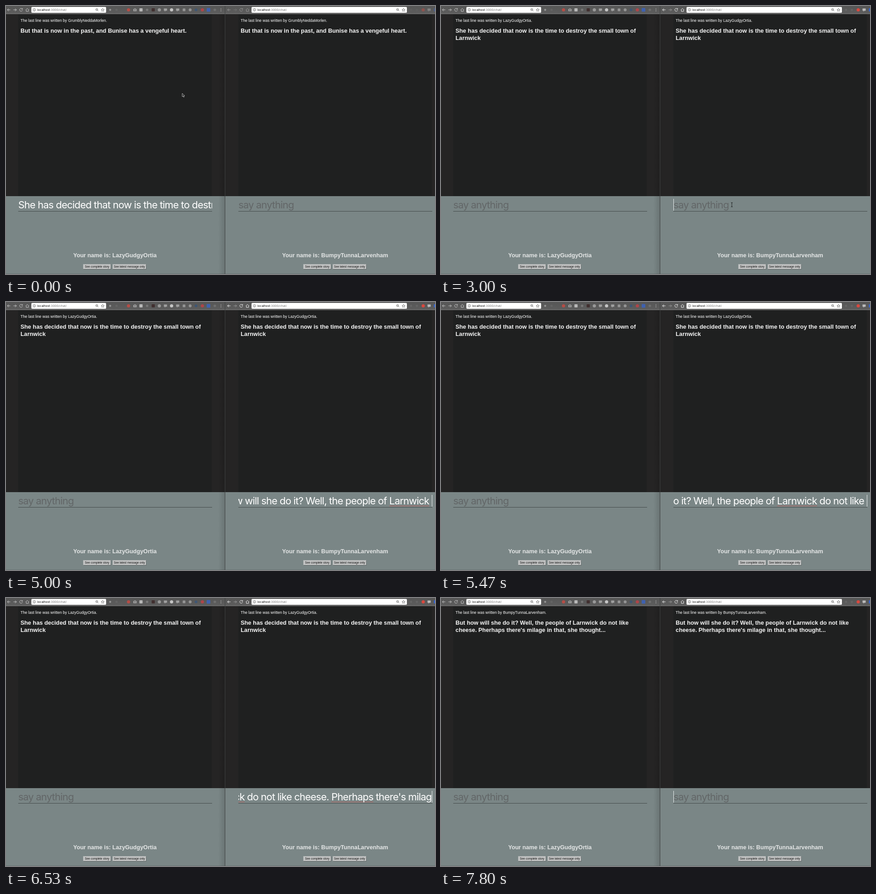
An HTML page that plays this animation: 947x592 px, repeating every 8000 ms.

```html
<!DOCTYPE html>
<html lang="en">
<head>
<meta charset="utf-8">
<title>Story chat</title>
<style>
html, body { margin: 0; width: 100%; height: 100%; overflow: hidden; background: #232222; }
body { position: relative; font-family: "Liberation Sans", Arial, sans-serif; }
div, svg, button { position: absolute; box-sizing: border-box; }
.win { top: 0; height: 592px; overflow: hidden; background: #252424; }
#left { left: 0; width: 483px; }
#right { left: 484px; width: 463px; }
.in { top: 0; left: 0; width: 484px; height: 592px; }
#right .in { left: 2px; }
.bar { left: -2px; top: 0; width: 486px; height: 18px; background: linear-gradient(#565656, #5d5d5d 85%, #707070); }
.bar svg { left: 2px; top: 0; overflow: visible; }
.icons { opacity: .72; }
#right .icons { opacity: .4; }
.active .icons, #right.active .icons { opacity: 1; }
.url { font: 6.6px Inter, sans-serif; fill: #777; }
.url .host { fill: #111; }
.panel { left: 27px; top: 18px; width: 427px; height: 402px; background: #1f2020; }
.foot { left: -2px; top: 420px; width: 486px; height: 172px; background: #7a8686; border-bottom: 1px solid #687373; }
.by { left: 32px; top: 27px; font-size: 8.55px; line-height: 10px; color: #fff; white-space: nowrap; }
.line { left: 32px; top: 47px; width: 418px; font: bold 12.82px/16px "Liberation Sans", Arial, sans-serif; color: #f4f4f4; }
.field { left: 27px; top: 426px; width: 427.5px; height: 28px; overflow: hidden; border-bottom: 1px solid #434a4a; }
.text { left: 0; top: 0; height: 26px; white-space: pre; font: 22px/26px Inter, sans-serif; letter-spacing: -.036em; color: #fff; }
.text.hint { color: #626667; }
.text u { text-decoration: underline 1px #b8605c; text-underline-offset: 3px; text-decoration-skip-ink: none; }
.caret { top: 0; width: 1px; height: 26px; background: #e9eeee; }
.name { left: 27px; top: 542.6px; width: 427px; text-align: center; font: bold 12.68px/16px "Liberation Sans", Arial, sans-serif; color: #e4e6e6; }
button { top: 569.5px; height: 12px; padding: 0; border: 1px solid #a4a9a9; border-bottom-color: #5c6363; border-right-color: #687070; background: #c4c5c5; color: #0c0c0c; font: 6.3px/9px "Liberation Sans", Arial, sans-serif; white-space: nowrap; }
#edge { left: 483px; top: 0; width: 1px; height: 592px; background: #3f4141; }
#shade { top: 18px; width: 14px; height: 574px; }
#shade.l { left: 469px; background: linear-gradient(90deg, #0000, #0002); }
#shade.r { left: 484px; background: linear-gradient(270deg, #0000, #0002); }
#mouse { left: 0; top: 0; overflow: visible; }
</style>
</head>
<body>
<div id="left" class="win"></div>
<div id="right" class="win"></div>
<div id="edge"></div>
<div id="shade"></div>
<svg id="mouse" width="10" height="14">
  <path id="arrow" d="M0 0V7.2L1.7 5.6L3 8.4L4.3 7.8L3.1 5.2H5.3Z" fill="#111" stroke="#ddd" stroke-width=".8"/>
  <path id="beam" d="M0 0Q2 0 2 1.5Q2 0 4 0M2 1V9M0 10Q2 10 2 8.5Q2 10 4 10" fill="none" stroke="#111" stroke-width=".8"/>
</svg>
<script>
const LOOP = 8000, STEP = 200 / 3, HINT = 'say anything';
const LEFT_NAME = 'LazyGudgyOrtia', RIGHT_NAME = 'BumpyTunnaLarvenham';
const LINES = [
  ['GrumblyNeddaMorlen', 'But that is now in the past, and Bunise has a vengeful heart.'],
  [LEFT_NAME, 'She has decided that now is the time to destroy the small town of Larnwick'],
  [RIGHT_NAME, "But how will she do it? Well, the people of Larnwick do not like cheese. Pherhaps there's milage in that, she thought..."]
];
// [ms, characters typed]
const TYPED = [[3130, 1], [3930, 27], [4200, 33], [5470, 65], [6130, 82], [7000, 110], [7330, 120]];
// [ms, x, y]
const MOVES = [[130, 389, 193], [330, 396, 264], [470, 396, 264], [1130, 309, 434], [2270, 309, 434], [2870, 640, 434]];

const $ = id => document.getElementById(id);
const dot = (x, c, r = 3.6) => `<circle cx="${x}" cy="8.5" r="${r}" fill="${c}"/>`;
const box = (x, c, s = 7) => `<rect x="${x - s / 2}" y="${8.5 - s / 2}" width="${s}" height="${s}" rx="1" fill="${c}"/>`;
const bubble = x => `<path d="M${x - 3.5} 5.5h7v5h-3l-2 2v-2h-2z" fill="#bbb"/>`;

function bar(end, extra, forward) {
  return `<div class="bar"><svg width="484" height="18">
    <g class="icons"><g fill="none" stroke="#eee">
      <path d="M9.5 8.5H3M6 5.5L3 8.5L6 11.5"/>
      <path d="M16.5 8.5H23M20 5.5L23 8.5L20 11.5" opacity="${forward}"/>
      <path d="M35.6 6.2A3.2 3.2 0 1 0 36.4 9.2M36.4 4.8V7.2H34"/>
      <path d="M43.4 8.8L47 5.2L50.6 8.8M44.6 8.3V12H49.4V8.3"/></g>${extra}</g>
    <rect x="56" y="2" width="${end - 56}" height="13" rx="2" fill="#fff"/>
    <g fill="none" stroke="#555" stroke-width=".8">
      <circle cx="62.5" cy="8.5" r="2.9"/><path d="M62.5 8V10.3M62.5 6.4V7.2"/>
      <circle cx="${end - 20.6}" cy="7.8" r="2.3"/><path d="M${end - 19} 9.5l2.2 2.2M${end - 21.8} 7.8h2.4"/>
      <path d="M${end - 7.5} 5.2l1 2.2 2.4.3-1.8 1.6.5 2.4-2.1-1.2-2.1 1.2.5-2.4-1.8-1.6 2.4-.3z"/></g>
    <text class="url" x="69" y="11"><tspan class="host">localhost</tspan>:3000/chat/</text>
  </svg></div>`;
}

const leftIcons = dot(230, '#aaa', 2.2) + dot(244, '#696969', 2.5) + dot(270.5, '#d9493f') +
  `<path d="M281 6.5h2l1-1.3h1.5l1 1.3h1.8v5H281z" fill="#bbb"/>` + dot(284.6, '#666', 1.3) +
  box(298, '#ddd') + dot(311.5, '#828282', 2.8) + box(325, '#382020') + dot(338.5, '#b0b0b0') +
  bubble(352) + dot(365.5, '#eee') + bubble(379) + box(393, '#aaa', 6) + dot(406.5, '#aaa', 3.2) +
  dot(419.5, '#34557f', 3) + dot(433.5, '#cf3d43') + box(447, '#3565d2', 8) + dot(461, '#777', 2.8) +
  [5.7, 8.5, 11.3].map(y => `<circle cx="474.5" cy="${y}" r=".8" fill="#ddd"/>`).join('');
const rightIcons = dot(408, '#656565', 2.5) + dot(421, '#656565', 2.5) + dot(435, '#d9493f') + bubble(448) + box(462, '#3565d2');

function build(id, name, chrome) {
  const win = $(id);
  win.innerHTML = `<div class="in">${chrome}
    <div class="panel"></div><div class="foot"></div>
    <div class="by"></div><div class="line"></div>
    <div class="field"><div class="text"></div><div class="caret"></div></div>
    <div class="name">Your name is: ${name}</div>
    <button style="left:170px;width:62px">See complete story</button>
    <button style="left:234.5px;width:75.5px">See latest message only</button></div>`;
  const part = c => win.querySelector('.' + c);
  return { win, by: part('by'), line: part('line'), text: part('text'), caret: part('caret') };
}
const left = build('left', LEFT_NAME, bar(221, leftIcons, 1));
const right = build('right', RIGHT_NAME, bar(399, rightIcons, .4));

function track(keys, t) {
  if (t <= keys[0][0]) return keys[0].slice(1);
  for (let i = 1; i < keys.length; i++) {
    const [a, ...from] = keys[i - 1], [b, ...to] = keys[i];
    if (t <= b) return from.map((v, j) => v + (to[j] - v) * (t - a) / (b - a));
  }
  return keys[keys.length - 1].slice(1);
}

function fill(side, value, caret, scroll) {
  const { text, caret: bar } = side;
  text.className = value ? 'text' : 'text hint';
  text.innerHTML = value ? value.replace(/(Larnwick|Pherhaps)(?=\W)/g, '<u>$1</u>') : HINT;
  const width = text.getBoundingClientRect().width;
  const shift = scroll ? Math.min(0, 426.5 - width) : 0;
  text.style.left = shift + 'px';
  bar.style.left = (value ? width + shift : 0) + 'px';
  bar.style.display = caret ? '' : 'none';
}

function draw(t) {
  const [writer, line] = LINES[t < 1600 ? 0 : t < 7470 ? 1 : 2];
  for (const side of [left, right]) {
    side.by.textContent = `The last line was written by ${writer}.`;
    side.line.textContent = line;
  }
  const focus = t < 200 ? '' : t < 2670 ? 'left' : 'right';
  left.win.classList.toggle('active', focus === 'left');
  right.win.classList.toggle('active', focus === 'right');
  $('shade').className = focus === 'left' ? 'r' : 'l';

  const count = t < 3130 || t >= 7470 ? 0 : Math.round(track(TYPED, t)[0]);
  fill(left, t < 1600 ? LINES[1][1] : '', t >= 1270 && t < 2000, t >= 1270);
  fill(right, LINES[2][1].slice(0, count), t >= 2870, true);

  const [x, y] = track(MOVES, t);
  const shown = t < 1270 || (t >= 2270 && t < 3130);
  const overField = y > 424 && (x < 454 || x > 513);
  $('mouse').style.display = shown ? '' : 'none';
  $('mouse').style.transform = `translate(${x}px, ${y}px)`;
  $('arrow').style.display = overField ? 'none' : '';
  $('beam').style.display = overField ? '' : 'none';
}

const start = performance.now();
let last = -1;
function tick() {
  const step = Math.floor(((performance.now() - start) % LOOP + 4) / STEP);
  if (step !== last) {
    last = step;
    draw(Math.round(step * STEP / 10) * 10);
  }
  requestAnimationFrame(tick);
}
draw(0);
tick();
</script>
</body>
</html>
```
